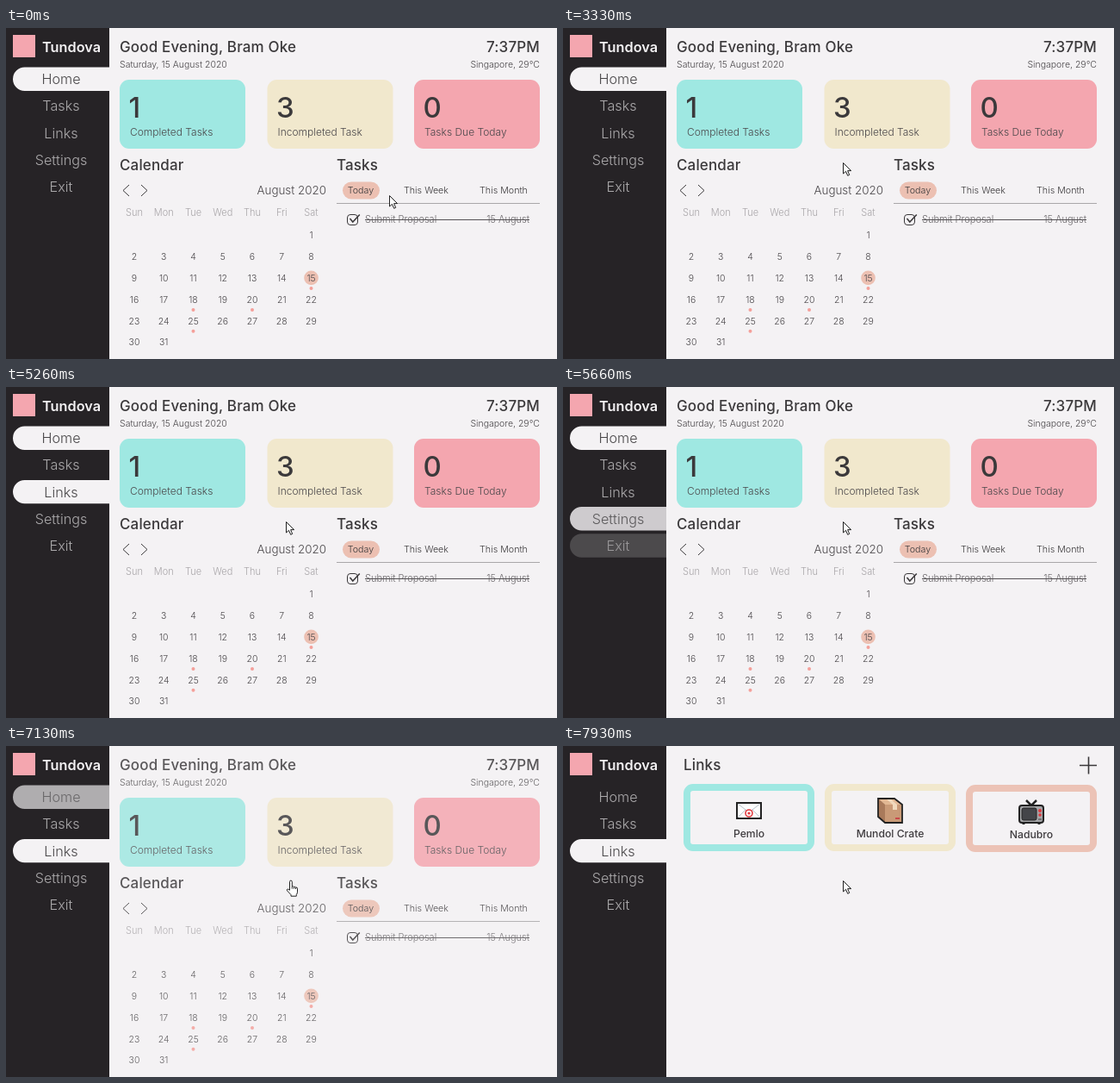
An HTML page for the animation above (8 s loop, 640 by 384 pixels).

```html
<!DOCTYPE html>
<html lang="en">
<head>
<meta charset="utf-8">
<title>Dashboard</title>
<style>
  html, body { margin: 0; width: 100%; height: 100%; overflow: hidden; background: #f4f2f4; }
  svg { display: block; width: 640px; height: 384px; }
  text { font: 350 12px Inter, "Open Sans", sans-serif; fill: #4a474a; }
  .title { font-size: 17px; font-weight: 450; fill: #3b393b; letter-spacing: .15px; }
  .small { font-size: 10.5px; }
  .count { font-size: 33px; font-weight: 450; fill: #3b393b; }
  .brand { font-size: 16.3px; font-weight: 600; fill: #f4f2f4; }
  .menu { font-size: 16.2px; }
  .month { font-size: 13.4px; }
  .day { font-size: 11px; fill: #a8a5a8; }
  .tab { font-size: 10.7px; fill: #3a383a; }
  .done { font-size: 11px; fill: #6b686b; }
  .label { font-size: 12.2px; font-weight: 450; fill: #3f3c3f; }
  .mid { text-anchor: middle; }
  .end { text-anchor: end; }
  .line { fill: none; stroke: #3a383a; stroke-width: 1; }
</style>
</head>
<body>
<svg viewBox="0 0 640 384">
  <rect width="640" height="384" fill="#f4f2f4"/>

  <g id="home">
    <text class="title" x="132" y="28">Good Evening, Bram Oke</text>
    <text class="small" x="132" y="46">Saturday, 15 August 2020</text>
    <text class="title end" x="620" y="28">7:37PM</text>
    <text class="small end" x="620" y="46">Singapore, 29°C</text>
    <g id="stats"></g>

    <text class="title" x="132" y="164.5">Calendar</text>
    <path class="line" d="M143 182l-7 6.5 7 6.5M157 182l7 6.5-7 6.5"/>
    <text class="month end" x="372" y="193">August 2020</text>
    <g id="calendar"></g>

    <text class="title" x="384" y="164.5">Tasks</text>
    <rect x="391" y="178.5" width="43" height="20" rx="10" fill="#ecc0b2"/>
    <text class="tab mid" x="412" y="192">Today</text>
    <text class="tab mid" x="488" y="192">This Week</text>
    <text class="tab mid" x="578" y="192">This Month</text>
    <path d="M384 203.5H620" stroke="#a9a7a9"/>
    <rect class="line" x="396.5" y="216.5" width="12" height="12" rx="3.5"/>
    <path class="line" d="M399.5 221l3.3 4 8-8.5" style="stroke-width:1.5"/>
    <text class="done" x="417" y="226">Submit Proposal</text>
    <text class="done end" x="608" y="226">15 August</text>
    <path d="M417 222.5H608" stroke="#555255"/>
  </g>

  <g id="links">
    <text class="title" x="140" y="28">Links</text>
    <path class="line" d="M600 22.5h20M610.5 12.5v20" style="stroke-width:1.6"/>
  </g>
  <g id="cards"></g>

  <rect width="120" height="384" fill="#262326"/>
  <rect x="8" y="8" width="26" height="26" fill="#f4a6af"/>
  <text class="brand" x="42" y="27.5">Tundova</text>
  <g id="menu"></g>

  <g id="cursor" stroke="#222" stroke-linejoin="round" fill="#fff">
    <path id="arrow" d="M.5 .5V13l3-2.7 2.2 5 2-.9-2.1-4.8h4z"/>
    <path id="hand" transform="translate(-.5 -.8)" d="M5 12V2.3a1.4 1.4 0 0 1 2.8 0V8q1.3-1 2.2.3 1.3-.7 2 .5 1.8-.4 2 1.2v4q0 2-1.2 3.2V19H6.5v-1.6L2 12.6q-.8-1.6.8-1.8zM7.8 8v2.5M10 8.3v2.2M12 8.8v2"/>
  </g>
</svg>

<script>
const $ = id => document.getElementById(id);
const clamp = v => Math.min(1, Math.max(0, v));
const ramp = (t, start, length) => clamp((t - start) / length);
const mix = (a, b, p) => a + (b - a) * p;
const text = (cls, x, y, s) => `<text class="${cls}" x="${x}" y="${y}">${s}</text>`;

// Summary cards
$('stats').innerHTML = [
  [132, '#9fe8e2', 1, 'Completed Tasks'],
  [303.5, '#f1e8cd', 3, 'Incompleted Task'],
  [474, '#f4a6af', 0, 'Tasks Due Today']
].map(([x, color, n, name]) =>
  `<rect x="${x}" y="60" width="146" height="80" rx="11" fill="${color}"/>` +
  text('count', x + 10.5, 104, n) + text('', x + 12, 125, name)).join('');

// Calendar
const colX = c => 149 + c * 34.25;
const rowY = r => 244.3 + r * 24.8;
const dot = (x, y, r, color) => `<circle cx="${x}" cy="${y}" r="${r}" fill="${color}"/>`;
let grid = ['Sun', 'Mon', 'Tue', 'Wed', 'Thu', 'Fri', 'Sat']
  .map((d, c) => text('day mid', colX(c), 218, d)).join('');
for (let d = 1; d <= 31; d++) {
  const x = colX((d + 5) % 7), y = rowY(Math.floor((d + 5) / 7));
  if (d === 15) grid += dot(x, y - 4, 8.3, '#ecc0b2');
  if ([15, 18, 20, 25].includes(d)) grid += dot(x, y + 8.2, 2, '#f4a09a');
  grid += text('small mid', x, y, d);
}
$('calendar').innerHTML = grid;

// Link cards, icons drawn around the card's centre line
const icons = [
  `<rect x="-14" y="66" width="28" height="18" fill="#fff" stroke="#222" stroke-width="2"/>
   <path d="M-13 67L0 77 13 67M-13 83l9-9M13 83l-9-9" fill="none" stroke="#b9c3cc"/>
   <circle cy="78" r="4" fill="#fff" stroke="#e0393e" stroke-width="1.6"/>
   <circle cy="78" r="1.6" fill="#e0393e"/>`,
  `<path d="M-14 61H5l9 7v21H-6l-8-7z" fill="#c99a77"/>
   <path d="M-14 61H5l9 7H-6z" fill="#e2b894"/>
   <path d="M-14 61l8 7v21l-8-7z" fill="#a97a5b"/>
   <path d="M-5 61h5l8 7v6H3v-6z" fill="#f0d9bd"/>
   <path d="M6 84h5" stroke="#c9484a" stroke-width="2"/>
   <path d="M-14 61H5l9 7v21H-6l-8-7z" fill="none" stroke="#222" stroke-width="1.8"/>`,
  `<path d="M-6 62l6 6 6-6" fill="none" stroke="#222" stroke-width="2.5"/>
   <path d="M-9 88v2M9 88v2" stroke="#222" stroke-width="3"/>
   <rect x="-14" y="68" width="28" height="20" rx="3" fill="#a5a6a8" stroke="#222" stroke-width="2"/>
   <rect x="-11" y="71" width="17" height="14" rx="2" fill="#444549" stroke="#222"/>
   <circle cx="10" cy="74" r="2" fill="#e0393e"/><circle cx="10" cy="79" r="1.8" fill="#e0393e"/>
   <path d="M8 84h4" stroke="#444"/>`
];
$('cards').innerHTML = [
  ['#9fe8e2', 'Pemlo'], ['#f1e8cd', 'Mundol Crate'], ['#ecc3b6', 'Nadubro']
].map(([color, name], i) => `<g><g transform="translate(${216 + i * 164} 0)">
  <rect x="-72" y="48" width="144" height="70" rx="7" fill="#f4f2f4" stroke="${color}" stroke-width="8"/>
  ${icons[i]}${text('label mid', 0, 106, name)}</g></g>`).join('');

// Side menu
$('menu').innerHTML = ['Home', 'Tasks', 'Links', 'Settings', 'Exit'].map((name, i) => {
  const y = 45.5 + i * 31.2;
  return `<g><path d="M120 ${y}H21.7a13.7 13.7 0 0 0 0 27.4H120z" fill="#f4f2f4"/>` +
    text('menu mid', 64, y + 19.6, name) + '</g>';
}).join('');

// Lit periods of each menu item: [item, from, to]
const lit = [
  [0, -999, 7067], [1, 4733, 5060], [2, 5060, 5390], [3, 5390, 5630],
  [4, 5630, 5870], [3, 5870, 6060], [2, 6060, 6250], [1, 6250, 6410], [2, 6410, 9999]
];

// Pointer path: [time, x, y]
const path = [
  [0, 445, 194], [467, 445, 194], [533, 492, 168], [600, 575, 118],
  [867, 314, 160], [933, 285, 167], [1000, 251, 176], [1533, 251, 176],
  [1600, 136, 220], [1800, 150, 226], [2067, 197, 205], [2200, 197, 205],
  [2467, 262, 160], [2667, 340, 95], [2867, 410, 125], [3067, 325, 156], [8000, 325, 156]
];

function pointAt(t) {
  const i = Math.max(1, path.findIndex(p => p[0] >= t));
  const [a, b] = [path[i - 1], path[i]];
  const p = ramp(t, a[0], b[0] - a[0]);
  return [mix(a[1], b[1], p), mix(a[2], b[2], p)].map(Math.round);
}

function render(t) {
  [...$('menu').children].forEach((g, i) => {
    const level = clamp(lit.filter(l => l[0] === i)
      .reduce((sum, [, from, to]) => sum + ramp(t, from, 200) - ramp(t, to, 200), 0));
    const shade = Math.round(mix(172, 73, level));
    g.firstChild.style.opacity = level;
    g.lastChild.style.fill = `rgb(${shade},${shade - 2},${shade})`;
  });

  $('home').style.opacity = 1 - ramp(t, 7060, 440);
  $('links').style.opacity = ramp(t, 7400, 250);
  [...$('cards').children].forEach((g, i) => {
    const p = ramp(t, 7505 + i * 95, 350);
    g.style.opacity = clamp(p * 1.5);
    g.setAttribute('transform', `translate(0 ${Math.round(30 * (1 - p) ** 3)})`);
  });

  const [x, y] = pointAt(t);
  const pressing = t > 7050 && t < 7700;
  $('cursor').setAttribute('transform', `translate(${x} ${y})`);
  $('cursor').style.display = t > 610 && t < 860 ? 'none' : '';
  $('arrow').style.display = pressing ? 'none' : '';
  $('hand').style.display = pressing ? '' : 'none';
}

const step = 1000 / 15;
const start = performance.now();
function tick() {
  const t = (performance.now() - start) % 8000;
  render(Math.min(119, Math.floor((t + 7) / step)) * step);
  requestAnimationFrame(tick);
}
tick();
</script>
</body>
</html>
```
